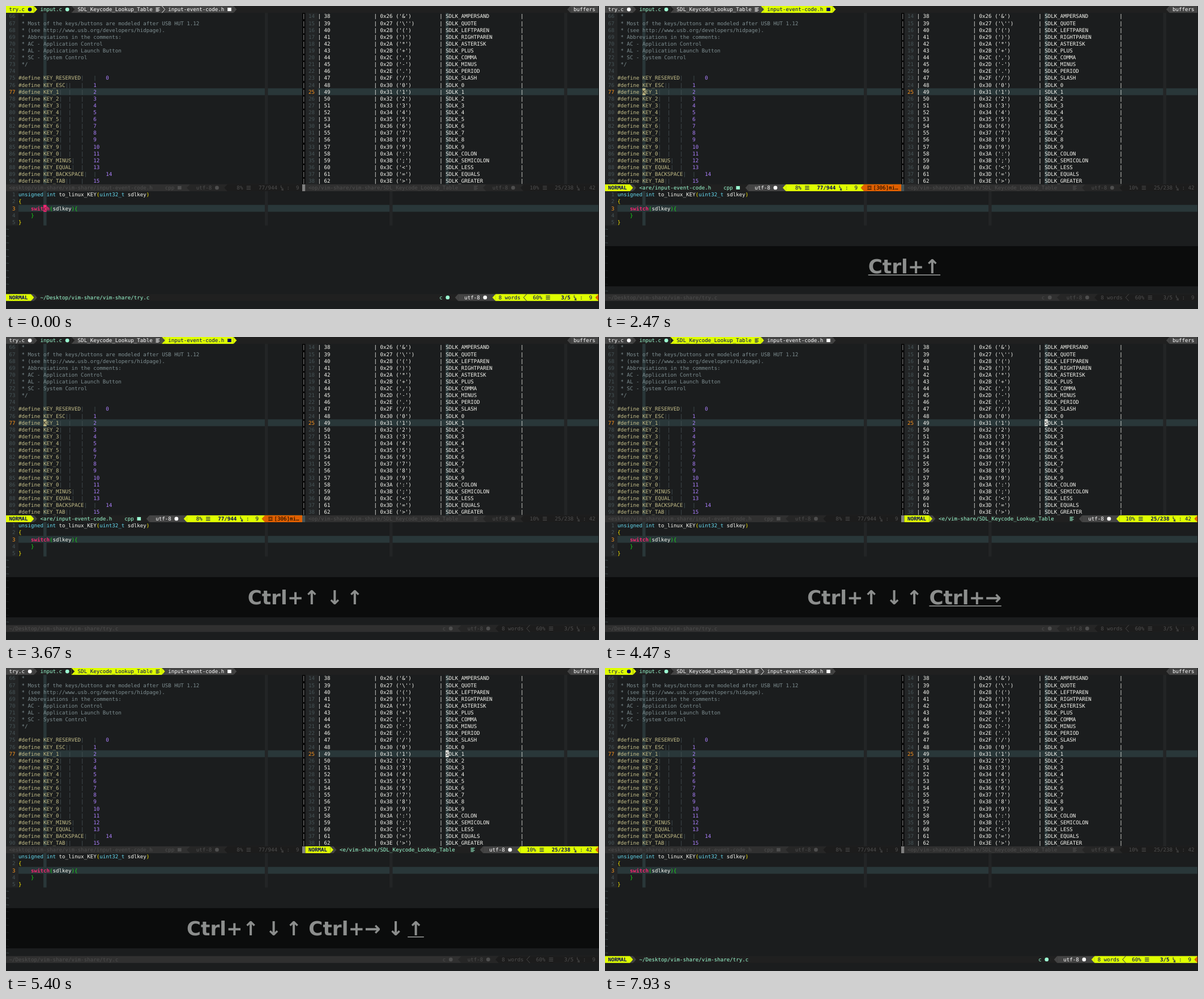
An HTML page with a canvas for the animation above (8000 ms loop, 1047 px wide and 535 px high).

```html
<!DOCTYPE html>
<html lang="en">
<head>
<meta charset="utf-8">
<title>Editor windows</title>
<style>
html, body { margin: 0; width: 100%; height: 100%; overflow: hidden; background: #1b1d1e; }
canvas { display: block; }
</style>
</head>
<body>
<canvas id="stage" width="1047" height="535"></canvas>
<script>
const ctx = document.getElementById('stage').getContext('2d');
// Terminal cells of 10 by 22 px, scaled down
const SCALE = 0.5505, CW = 10 * SCALE, RH = 22 * SCALE, LOOP = 8000;
const MONO = '9.2px "DejaVu Sans Mono", monospace';
const BG = '#1b1d1e', FG = '#f8f8f2', GUTTER = '#232526', LINE = '#293739', DIM = '#465457';
const YELLOW = '#dfff00', GRAY = '#444444', DARK = '#202020', MINT = '#9cffd3', INK = '#00005f';
const ORANGE = '#df5f00', KHAKI = '#c4be89', PINK = '#f92672', BLUE = '#66d9ef', PURPLE = '#ae81ff';
const BRACE1 = '#ffee00', BRACE2 = '#19dd19', MUTED = '#4e4e4e';

const comment = [' *', ' * Most of the keys/buttons are modeled after USB HUT 1.12',
  ' * (see http://www.usb.org/developers/hidpage).', ' * Abbreviations in the comments:',
  ' * AC - Application Control', ' * AL - Application Launch Button',
  ' * SC - System Control', ' */', ''];
const keys = 'RESERVED ESC 1 2 3 4 5 6 7 8 9 0 MINUS EQUAL BACKSPACE TAB'.split(' ');
const syms = ('AMPERSAND QUOTE LEFTPAREN RIGHTPAREN ASTERISK PLUS COMMA MINUS PERIOD SLASH ' +
  '0 1 2 3 4 5 6 7 8 9 COLON SEMICOLON LESS EQUALS GREATER').split(' ');

function cells(col, row, n, color, rows = 1) {
  ctx.fillStyle = color;
  ctx.fillRect(col * CW, row * RH, n * CW, rows * RH);
}

function text(str, col, row, color, bold) {
  ctx.font = (bold ? 'bold ' : '') + MONO;
  ctx.fillStyle = color;
  for (let i = 0; i < str.length; i++) {
    if (str[i] !== ' ') ctx.fillText(str[i], (col + i) * CW, row * RH + 9.35);
  }
}

// Powerline separator: dir 1 points right, -1 points left
function arrow(col, row, dir, color, bg, thin) {
  const y = row * RH, x = (dir > 0 ? col : col + 1) * CW;
  if (bg) cells(col, row, 1, bg);
  ctx.beginPath();
  ctx.moveTo(x, y);
  ctx.lineTo(x + dir * CW, y + RH / 2);
  ctx.lineTo(x, y + RH);
  if (thin) {
    ctx.strokeStyle = color;
    ctx.lineWidth = 0.9;
    ctx.stroke();
  } else {
    ctx.fillStyle = color;
    ctx.fill();
  }
}

function icon(kind, col, row, color) {
  const x = col * CW, y = row * RH + RH / 2;
  ctx.fillStyle = color;
  if (kind === 'dot') {
    ctx.beginPath();
    ctx.arc(x + 3.6, y, 3.4, 0, 7);
    ctx.fill();
  } else if (kind === 'box') {
    ctx.fillRect(x + 0.3, y - 3, 6.6, 6);
  } else if (kind === 'doc') {
    [7, 5, 7, 5].forEach((w, i) => ctx.fillRect(x + 0.3, y - 3.4 + i * 2, w, 1));
  } else if (kind === 'menu') {
    for (let i = -1; i < 2; i++) ctx.fillRect(x + 0.8, y - 0.5 + i * 2.7, 7.4, 1);
  } else if (kind === 'fire') {
    ctx.fillRect(x + 0.8, y - 3.2, 7.4, 1);
    ctx.fillRect(x + 0.8, y - 0.5, 3, 1);
    ctx.fillRect(x + 5.2, y - 0.5, 3, 1);
    ctx.fillRect(x + 0.8, y + 2.2, 7.4, 1);
  } else if (kind === 'ln') {
    ctx.font = 'bold 6px "DejaVu Sans Mono", monospace';
    ctx.fillText('L', x, y);
    ctx.fillText('N', x + 1.8, y + 5);
  }
}

function cursor(ch, col, row, color) {
  cells(col, row, 1, color);
  text(ch, col, row, BG);
}

function tabs(active) {
  const back = i => i === 1 ? DARK : i === active ? YELLOW : GRAY;
  const list = [['try.c', 0, 9, 'dot'], ['input.c', 10, 21, 'dot'],
    ['SDL_Keycode_Lookup_Table', 22, 50, 'doc'], ['input-event-code.h', 51, 73, 'box']];
  cells(0, 0, 190, DARK);
  list.forEach(([name, a, b, kind], i) => {
    const fg = i === active ? INK : i === 1 ? MINT : '#ffffff';
    const next = i < 3 ? back(i + 1) : DARK;
    cells(a, 0, b - a, back(i));
    text(name, a + 1, 0, fg);
    icon(kind, a + 2 + name.length, 0, fg);
    const same = next === back(i);
    arrow(b, 0, 1, same ? '#ffffff' : back(i), next, same);
  });
  arrow(180, 0, -1, GRAY);
  cells(181, 0, 9, GRAY);
  text('buffers', 182, 0, '#ffffff');
}

function status(s, on) {
  const { a, b, row } = s;
  const y = on ? s.y : s.yOff, z = y + 12;
  const [cBg, yBg, zBg] = on ? [DARK, GRAY, YELLOW] : ['#303030', '#262626', '#1c1c1c'];
  const [cFg, yFg, zFg] = on ? [MINT, '#ffffff', INK] : [MUTED, MUTED, MUTED];
  cells(a, row, b - a, cBg);
  if (on) {
    cells(a, row, 8, YELLOW);
    text('NORMAL', a + 1, row, INK, true);
    arrow(a + 8, row, 1, YELLOW, GRAY);
    arrow(a + 9, row, 1, GRAY, DARK);
  }
  text(on ? s.name : s.nameOff, a + (on ? 11 : 1), row, cFg);
  text(s.type, y - 4 - s.type.length, row, cFg);
  icon(s.icon, y - 3, row, cFg);

  arrow(y, row, -1, yBg);
  cells(y + 1, row, b - y - 1, yBg);
  text('utf-8', y + 3, row, yFg);
  icon('dot', y + 9, row, yFg);

  arrow(z, row, -1, zBg);
  cells(z + 1, row, b - z - 1, zBg);
  let p = z + 3;
  if (s.words) {
    text(s.words, z + 2, row, zFg);
    arrow(z + 10, row, -1, zFg, null, true);
    p = z + 13;
  }
  text(s.pct.padStart(3), p, row, zFg);
  icon('menu', p + 4, row, zFg);
  text(String(s.line).padStart(4) + '/' + s.total, p + 6, row, zFg, on);
  const ln = p + 12 + s.total.length;
  icon('ln', ln, row, zFg);
  text(':' + s.col.padStart(3), ln + 2, row, zFg);
  if (on) {
    arrow(ln + 7, row, -1, ORANGE);
    cells(ln + 8, row, b - ln - 8, ORANGE);
    if (s.warn) {
      icon('fire', ln + 9, row, '#000000');
      text(s.warn, ln + 11, row, '#000000');
    }
  }
}

// Gutter, cursor line, cursor column, colour columns and line numbers of one window
function pane(a, b, row, rows, num, first, current, curCol, marks) {
  cells(a, row, num, GUTTER, rows);
  cells(a + num, row + current - first, b - a - num, LINE);
  cells(curCol, row, 1, LINE, rows);
  marks.forEach(m => cells(m, row, 1, GUTTER, rows));
  for (let i = 0; i < rows; i++) {
    const n = first + i;
    text(String(n).padStart(num - 1), a, row + i, n === current ? '#fd971f' : DIM);
  }
}

function headerPane(line) {
  pane(0, 95, 1, 25, 4, 66, line, 12, [83]);
  comment.forEach((s, i) => text(s, 4, 1 + i, '#7e8e91'));
  keys.forEach((k, i) => {
    const s = '#define KEY_' + k, row = 10 + i, end = s.length < 20 ? 24 : 28;
    text(s, 4, row, KHAKI);
    for (let c = s.length; c < end; c = (c >> 2) * 4 + 4) text('|', 4 + c, row, DIM);
    text(String(i), 4 + end, row, PURPLE);
  });
}

function tablePane(line) {
  pane(96, 190, 1, 25, 4, 14, line, 141, [179]);
  syms.forEach((name, i) => {
    const n = 38 + i, row = 1 + i, ch = n === 39 ? "\\'" : String.fromCharCode(n);
    text('| ' + n, 100, row, FG);
    text(`| 0x${n.toString(16).toUpperCase()} ('${ch}')`, 118, row, FG);
    text('| SDLK_' + name, 139, row, FG);
    text('|', 165, row, FG);
  });
}

function codePane() {
  pane(0, 190, 27, 5, 4, 1, 3, 12, [83, 123]);
  const put = (row, col, ...parts) => parts.forEach(([s, color, bold]) => {
    text(s, col, row, color, bold);
    col += s.length;
  });
  put(27, 4, ['unsigned int', BLUE], [' to_linux_KEY', FG], ['(', BRACE1],
    ['uint32_t', BLUE], [' sdlkey', FG], [')', BRACE1]);
  put(28, 4, ['{', BRACE1]);
  put(29, 8, ['switch', PINK, true], ['(', BRACE2], ['sdlkey', FG], ['){', BRACE2]);
  put(30, 8, ['}', BRACE2]);
  put(31, 4, ['}', BRACE1]);
  for (let r = 32; r < 42; r++) text('~', 0, r, DIM);
}

function overlay(shown, underline) {
  const size = 34.22, isCombo = k => k.length > 1;
  ctx.fillStyle = 'rgba(0,0,0,0.6)';
  ctx.fillRect(0, 424, 1047, 71);
  ctx.font = `bold ${size}px "DejaVu Sans", sans-serif`;
  ctx.fillStyle = '#8c8e8d';
  // A full space next to a key combination, a thin one between single keys
  let end = 0;
  const items = shown.map((key, i) => {
    if (i) end += size * (isCombo(key) || isCombo(shown[i - 1]) ? 0.348 : 0.2);
    const x = end, w = ctx.measureText(key).width;
    end += w;
    return { key, x, w };
  });
  const left = 528.4 - end / 2;
  items.forEach(({ key, x }) => ctx.fillText(key, left + x, 472));
  const last = items[items.length - 1];
  if (underline) ctx.fillRect(left + last.x, 474, last.w, 1.7);
}

const within = (t, ...spans) => spans.some(([a, b]) => t >= a && t < b);
const presses = [[2330, 2530, 'Ctrl+↑'], [3070, 3270, '↓'], [3470, 3670, '↑'],
  [4330, 4800, 'Ctrl+→'], [4870, 5130, '↓'], [5330, 5530, '↑'], [6270, 6400, 'Ctrl+↓']];

function draw(t) {
  const focus = t < 2470 || t >= 6270 ? 'code' : t < 4470 ? 'header' : 'table';
  const left = within(t, [3070, 3670]) ? 78 : 77;
  const right = within(t, [5130, 5400]) ? 26 : 25;
  const lit = !within(t, [270, 870], [1530, 2070], [2930, 3070], [4930, 5130],
    [5930, 6130], [6730, 7330], [7930, LOOP]);

  ctx.fillStyle = BG;
  ctx.fillRect(0, 0, 1047, 535);
  tabs({ code: 0, table: 2, header: 3 }[focus]);
  headerPane(left);
  tablePane(right);
  codePane();

  cells(95, 1, 1, '#080808', 25);
  for (let r = 1; r < 26; r++) text('|', 95, r, '#8c8c8c', true);
  cells(95, 26, 1, focus === 'header' ? '#455354' : '#808080');

  status({ a: 0, b: 95, row: 26, y: 45, yOff: 58, name: '<are/input-event-code.h',
    nameOff: '<esktop/vim-share/vim-share/input-event-code.h', type: 'cpp', icon: 'box',
    pct: '8%', line: left, total: '944', col: '9', warn: '[306]mi…' }, focus === 'header');
  status({ a: 96, b: 190, row: 26, y: 152, yOff: 153, name: '<e/vim-share/SDL_Keycode_Lookup_Table',
    nameOff: '<op/vim-share/vim-share/SDL_Keycode_Lookup_Table', type: '', icon: 'doc',
    pct: '10%', line: right, total: '238', col: '42' }, focus === 'table');
  const path = '~/Desktop/vim-share/vim-share/try.c';
  status({ a: 0, b: 190, row: 42, y: 144, yOff: 145, name: path, nameOff: path, type: 'c',
    icon: 'dot', words: '8 words', pct: '60%', line: 3, total: '5', col: '9' }, focus === 'code');

  if (lit) {
    if (focus === 'code') cursor('c', 12, 29, PINK);
    if (focus === 'header') cursor('K', 12, left - 65, KHAKI);
    if (focus === 'table') cursor('S', 141, right - 13, FG);
  }
  if (within(t, [2330, 7200])) {
    const past = presses.filter(p => p[0] <= t);
    overlay(past.map(p => p[2]), t < past[past.length - 1][1]);
  }
}

ctx.textRendering = 'geometricPrecision';
const start = performance.now();
function tick() {
  draw((performance.now() - start) % LOOP);
  requestAnimationFrame(tick);
}
tick();
</script>
</body>
</html>
```
